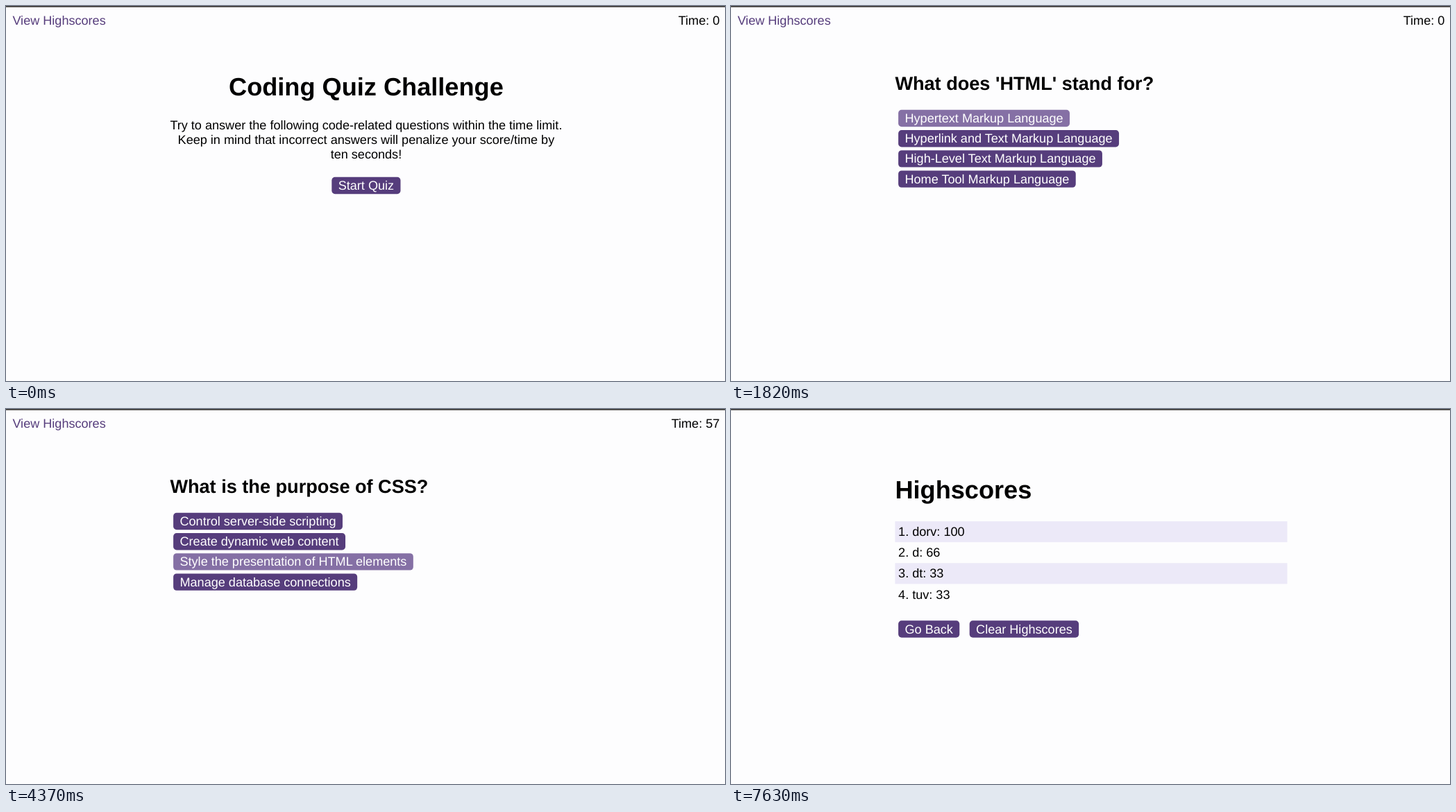
Write an HTML page that moves like this. It is 1036 px wide and 541 px high and loops after 8 s.

```html
<!DOCTYPE html>
<html lang="en">
<head>
<meta charset="utf-8">
<title>Coding Quiz Challenge</title>
<style>
  html, body { margin: 0; width: 100%; height: 100%; overflow: hidden; background: #fdfdfe; }
  svg { display: block; width: 100%; height: 100%; }
  text {
    font: 18.08px "Liberation Sans", Arial, sans-serif;
    text-rendering: geometricPrecision;
    white-space: pre;
  }
  .h1 { font-size: 36.16px; font-weight: bold; }
  .h2 { font-size: 27.12px; font-weight: bold; }
  .mid { text-anchor: middle; }
  .end { text-anchor: end; }
</style>
</head>
<body>
<svg id="stage" viewBox="0 0 1036 541" xmlns="http://www.w3.org/2000/svg"></svg>
<script>
const LOOP = 8000, FADE = 110;
const LEFT = 236.4, CENTER = 518.9, WIDTH = 565.1;
const BASE = [86, 61, 124], HOVER = [133, 112, 165];
const stage = document.getElementById("stage");
const buttons = [];

function add(parent, tag, attrs, content) {
  const node = document.createElementNS(stage.namespaceURI, tag);
  for (const key in attrs) node.setAttribute(key, attrs[key]);
  if (content !== undefined) node.textContent = content;
  return parent.appendChild(node);
}

function write(parent, x, y, content, cls = "", fill = "#000") {
  return add(parent, "text", { x, y, class: cls, fill }, content);
}

// hover is [enter, leave] in ms
function button(parent, x, y, label, hover) {
  const rect = add(parent, "rect", { y, height: 24.4, rx: 4.7, fill: `rgb(${BASE})` });
  const text = write(parent, 0, y + 18.2, label, "", "#fff");
  const width = text.getComputedTextLength() + 18.8;
  const left = x === "center" ? CENTER - width / 2 : x;
  rect.setAttribute("x", left);
  rect.setAttribute("width", width);
  text.setAttribute("x", left + 9.4);
  if (hover) buttons.push({ rect, hover });
}

function question(lines, choices, hovers) {
  const g = add(stage, "g");
  lines.forEach((line, i) => write(g, LEFT, 120.8 + i * 31.1, line, "h2"));
  const top = 149.8 + (lines.length - 1) * 31.1;
  choices.forEach((label, i) => button(g, 241.1, top + i * 29.2, label, hovers[i]));
  return g;
}

function intro() {
  const g = add(stage, "g");
  write(g, CENTER, 129.3, "Coding Quiz Challenge", "h1 mid");
  [
    "Try to answer the following code-related questions within the time limit.",
    "Keep in mind that incorrect answers will penalize your score/time by",
    "ten seconds!"
  ].forEach((line, i) => write(g, CENTER, 178.2 + i * 20.72, line, "mid"));
  button(g, "center", 246.8, "Start Quiz", [700, LOOP]);
  return g;
}

function result() {
  const g = add(stage, "g");
  write(g, LEFT, 120.8, "All done!", "h2");
  write(g, LEFT, 166.1, "Your final score is 100.");
  write(g, LEFT, 211.3, "Enter initials:");
  field.box = add(g, "rect", { fill: "#fff" });
  field.text = write(g, 348, 211.3, "");
  field.caret = add(g, "rect", { y: 196, width: 1, height: 19 });
  button(g, 563.8, 193.2, "Submit", [7020, LOOP]);
  return g;
}

function scores() {
  const g = add(stage, "g");
  write(g, LEFT, 129.3, "Highscores", "h1");
  ["dorv: 100", "d: 66", "dt: 33", "tuv: 33"].forEach((entry, i) => {
    const y = 162 + i * 30.14;
    if (i % 2 === 0) add(g, "rect", { x: LEFT, y, width: WIDTH, height: 30.14, fill: "#ece9f8" });
    write(g, 241.1, y + 21.2, `${i + 1}. ${entry}`);
  });
  button(g, 241.1, 305.3, "Go Back");
  button(g, 343.7, 305.3, "Clear Highscores");
  return g;
}

const field = {};
add(stage, "rect", { width: 1036, height: 541, fill: "#fdfdfe" });
add(stage, "rect", { width: 1036, height: 1.7, fill: "#3a3836" });
const header = add(stage, "g");
write(header, 9.4, 27.4, "View Highscores", "", `rgb(${BASE})`);
const clock = write(header, 1028.3, 27.4, "Time: 0", "end");

const scenes = [
  { from: 0, node: intro() },
  { from: 870, node: question(
    ["What does 'HTML' stand for?"],
    ["Hypertext Markup Language", "Hyperlink and Text Markup Language",
      "High-Level Text Markup Language", "Home Tool Markup Language"],
    [[1560, LOOP], [1370, 1560], [1170, 1370], [870, 1170]]) },
  { from: 2120, node: question(
    ["Which of the following is a JavaScript", "framework?"],
    ["React", "Django", "Java", "Python"],
    [[2610, LOOP]]) },
  { from: 3130, node: question(
    ["What is the purpose of CSS?"],
    ["Control server-side scripting", "Create dynamic web content",
      "Style the presentation of HTML elements", "Manage database connections"],
    [null, [3140, 3830], [3850, LOOP]]) },
  { from: 4400, node: result() },
  { from: 7290, node: scores() }
];

const ticks = [1850, 2850, 3850];
const keys = [5110, 5920, 6150, 6250, 6690];
const passed = (times, t) => times.filter(time => time <= t).length;

function ramp(t, start) {
  const p = Math.min(1, Math.max(0, (t - start) / FADE));
  return p * p * (3 - 2 * p);
}

function drawField(t) {
  const focused = t >= 5040;
  const inset = focused ? 1 : 1.5;
  const box = {
    x: 345 + inset, y: 192.2 + inset,
    width: 208.6 - 2 * inset, height: 26 - 2 * inset,
    rx: 2, stroke: focused ? "#101010" : "#767676", "stroke-width": focused ? 2 : 1
  };
  for (const key in box) field.box.setAttribute(key, box[key]);

  const count = passed(keys, t);
  field.text.textContent = "dorv".slice(0, Math.max(0, count - 1));
  const on = count > 0 && t - keys[count - 1] < 600;
  field.caret.setAttribute("x", 348 + field.text.getComputedTextLength());
  field.caret.setAttribute("visibility", on ? "inherit" : "hidden");
}

function draw(t) {
  const current = passed(scenes.map(s => s.from), t) - 1;
  scenes.forEach((s, i) => s.node.setAttribute("visibility", i === current ? "visible" : "hidden"));
  header.setAttribute("visibility", current === scenes.length - 1 ? "hidden" : "visible");

  const count = passed(ticks, t);
  clock.textContent = `Time: ${count ? 60 - count : 0}`;

  for (const { rect, hover } of buttons) {
    const k = ramp(t, hover[0]) - ramp(t, hover[1]);
    rect.setAttribute("fill", `rgb(${BASE.map((c, i) => Math.round(c + (HOVER[i] - c) * k))})`);
  }
  drawField(t);
}

const start = performance.now();
function frame() {
  draw((performance.now() - start) % LOOP);
  requestAnimationFrame(frame);
}
frame();
</script>
</body>
</html>
```
